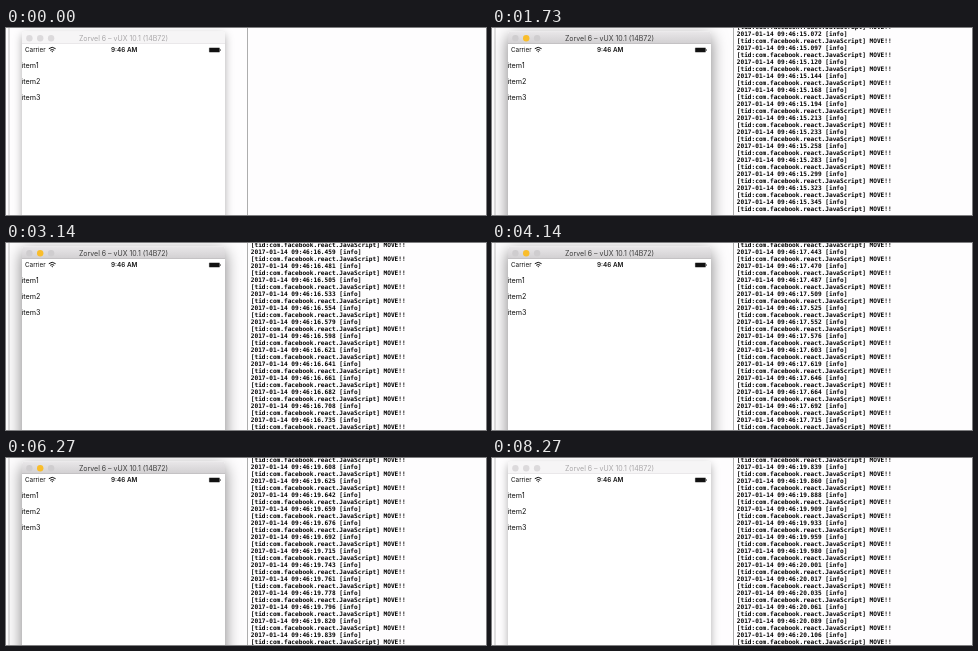
Recreate the animation shown at these times as an HTML page. Size 480x187 px, loop 8.31 s.

```html
<!DOCTYPE html>
<html lang="en">
<head>
<meta charset="utf-8">
<title>Move log</title>
<style>
  html, body { margin: 0; width: 100%; height: 100%; overflow: hidden; background: #fefdfe; }
  svg { display: block; width: 480px; height: 187px; }
  text { font-family: Inter, Roboto, sans-serif; fill: #111; }
  #log text { font: bold 6.13px "DejaVu Sans Mono", monospace; fill: #000; }
  #frame { filter: drop-shadow(0 3px 4px rgba(0, 0, 0, .32)); }
  .active #frame { filter: drop-shadow(0 5px 8px rgba(0, 0, 0, .5)); }
</style>
</head>
<body>
<svg id="stage" viewBox="0 0 480 187">
  <defs>
    <linearGradient id="bar" x2="0" y2="1">
      <stop stop-color="#e9e7e9"/><stop offset="1" stop-color="#d1cfd1"/>
    </linearGradient>
    <clipPath id="pane"><rect width="241" height="187"/></clipPath>
  </defs>
  <rect width="480" height="187" fill="#fefdfe"/>
  <g clip-path="url(#pane)">
    <rect x="2.5" width="1" height="187" fill="#c2c2c2"/>
    <rect id="frame" x="16" y="3.5" width="203" height="230" rx="3" fill="#fff"/>
    <path id="title" d="M16 16V6.5q0-3 3-3h197q3 0 3 3V16z"/>
    <rect id="edge" x="16" y="15.5" width="203" height=".5"/>
    <g id="lights">
      <circle cx="23.4" cy="10.3" r="3.2"/>
      <circle cx="34.2" cy="10.3" r="3.2"/>
      <circle cx="45.1" cy="10.3" r="3.2"/>
    </g>
    <text id="name" x="117.5" y="13" font-size="7" text-anchor="middle">Zorvel 6 – vUX 10.1 (14B72)</text>
    <text x="19" y="24.2" font-size="6.3">Carrier</text>
    <g fill="none" stroke="#111" stroke-width="1">
      <path d="M42.8 20.7q3.4-2.8 6.8 0M44.2 22.3q2-1.6 4 0"/>
      <circle cx="46.2" cy="23.6" r=".3"/>
    </g>
    <text x="118.2" y="24.2" font-size="6.3" font-weight="600" text-anchor="middle">9:46 AM</text>
    <rect x="202.9" y="19.6" width="11" height="4.8" rx=".9" fill="#111" fill-opacity=".5"/>
    <rect x="203.4" y="20" width="10" height="4" rx=".5" fill="#111"/>
    <rect x="214.3" y="21.2" width=".7" height="1.6" rx=".3" fill="#111"/>
    <g font-size="7.2">
      <text x="15.6" y="39.6">item1</text>
      <text x="15.6" y="56">item2</text>
      <text x="15.6" y="72.3">item3</text>
    </g>
  </g>
  <rect x="241" width="1" height="187" fill="#adadad"/>
  <g id="log"></g>
</svg>
<script>
const LOOP = 8310, START = 1270, BLUR = 7320, TICK = 1000 / 22;
const ROWS = 13, PITCH = 14.03, SETTLE = 1900;
const FIRST = 14900, LAST = 20116;  // log times in ms after 09:46
const $ = id => document.getElementById(id);

let seed = 7;
const random = () => (seed = seed * 16807 % 2147483647) / 2147483647;

// Touch moves arrive every 16 to 28 ms
const stamps = [];
for (let ms = FIRST; ms <= LAST; ms += 16 + Math.floor(random() * 13)) stamps.push(ms);

const logTime = t => 15350 + (t - 1725) * 0.991;

function label(ms) {
  const sec = Math.floor(ms / 1000);
  return `2017-01-14 09:46:${sec}.${String(ms % 1000).padStart(3, "0")} [info]`;
}

function addLine() {
  const el = document.createElementNS("http://www.w3.org/2000/svg", "text");
  el.setAttribute("x", 244.8);
  $("log").append(el);
  return el;
}
const rows = Array.from({ length: ROWS + 1 }, () => [addLine(), addLine()]);

function setActive(on) {
  const grey = on ? "#cfcdcf" : "#dcdadc";
  $("stage").classList.toggle("active", on);
  $("title").setAttribute("fill", on ? "url(#bar)" : "#f6f5f6");
  $("edge").setAttribute("fill", on ? "#b5b3b5" : "#dcdadc");
  $("name").style.fill = on ? "#3d3d3d" : "#a9a7a9";
  [...$("lights").children].forEach((c, i) =>
    c.setAttribute("fill", on && i === 1 ? "#f9bd2b" : grey));
}

function setLog(t) {
  const now = logTime(t);
  const count = stamps.filter(s => s <= now).length;
  const top = Math.max(0, count - ROWS);
  const base = t < SETTLE ? 7.7 : 10.7;
  rows.forEach(([info, move], i) => {
    const n = top + i - 1, y = base + (i - 1) * PITCH;
    const shown = n >= 0 && n < count;
    info.textContent = shown ? label(stamps[n]) : "";
    move.textContent = shown ? "[tid:com.facebook.react.JavaScript] MOVE!!" : "";
    info.setAttribute("y", y);
    move.setAttribute("y", y + PITCH / 2);
  });
}

function draw(time) {
  const t = time % LOOP;
  const step = Math.floor((t - START) / TICK + 0.01);
  setActive(t >= START && t < BLUR);
  setLog(START + step * TICK);
}

function loop() {
  draw(performance.now());
  requestAnimationFrame(loop);
}
loop();
</script>
</body>
</html>
```
